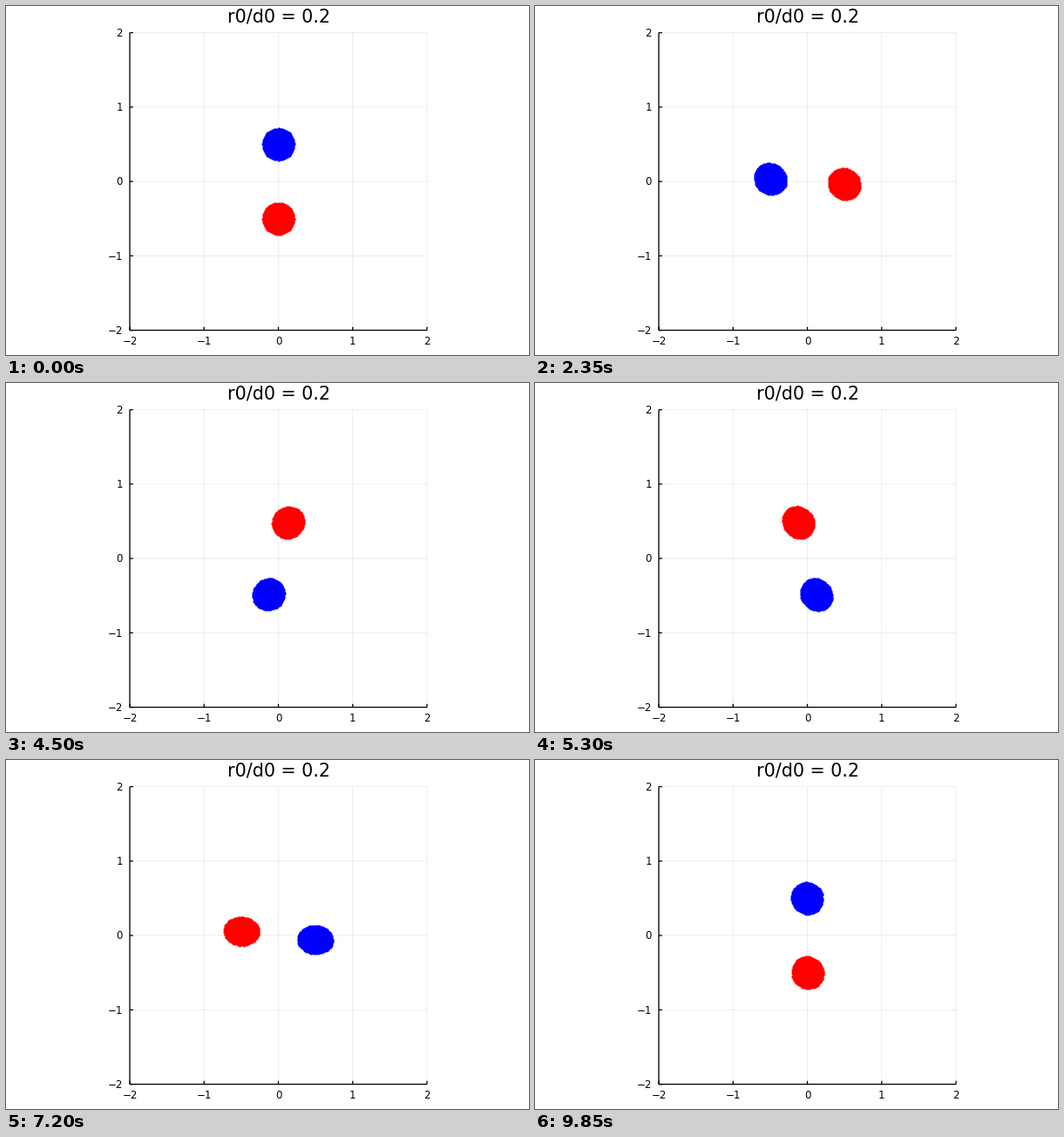
Write a matplotlib script that moves like this. It is 600 px wide and 400 px high and loops after 9900 ms.

```python
import numpy as np
import matplotlib.pyplot as plt
from matplotlib.animation import FuncAnimation

W, H, DPI = 600, 400, 100
FRAMES, INTERVAL = 198, 50
PX = 72 / DPI                       # points per pixel
CX, CY, UNIT = 312.5, 201.1, 85.25  # plot centre and pixels per data unit

RADIUS, RINGS = 0.2, 8              # vortex patch of concentric rings
TURN = np.radians(1.83)             # orbit angle per frame
SUBSTEPS = 2


def to_x(x):
    return CX + UNIT * x


def to_y(y):
    return CY - UNIT * y


def patch():
    """Points filling a disc evenly, centred at 0.5i."""
    points = [0j]
    for k in range(1, RINGS + 1):
        angles = 2 * np.pi * np.arange(6 * k) / (6 * k)
        points.extend(RADIUS * k / RINGS * np.exp(1j * angles))
    return np.array(points) + 0.5j


def velocity(z, eye):
    """Point vortices of one patch, moved by each other and the mirrored patch."""
    own = (1 / (z[:, None] - z + eye)).sum(axis=1) - 1
    other = (1 / (z[:, None] + z)).sum(axis=1)
    return np.conj(TURN / (2j * len(z)) * (own + other))


def simulate():
    z = patch()
    eye = np.eye(len(z))
    h = 1 / SUBSTEPS
    path = [z]
    for n in range(1, FRAMES):
        for _ in range(SUBSTEPS):
            a = velocity(z, eye)
            b = velocity(z + h / 2 * a, eye)
            c = velocity(z + h / 2 * b, eye)
            d = velocity(z + h * c, eye)
            z = z + h / 6 * (a + 2 * b + 2 * c + d)
        # keep the orbit at its nominal rate
        centre = z.mean()
        z = z * np.exp(1j * (np.pi / 2 + n * TURN)) * abs(centre) / centre
        path.append(z)
    return path


fig = plt.figure(figsize=(W / DPI, H / DPI), dpi=DPI, facecolor="white")
ax = fig.add_axes([0, 0, 1, 1])
ax.set_xlim(0, W)
ax.set_ylim(H, 0)
ax.axis("off")


def line(x, y, width, alpha=1.0, z=1):
    ax.plot(x, y, color="black", lw=width * PX, alpha=alpha, zorder=z,
            snap=False, solid_capstyle="butt")


def label(x, y, text, size, ha="center"):
    ax.text(x, y, text, fontsize=size * PX, family="DejaVu Sans",
            color="black", ha=ha, va="baseline")


LEFT, RIGHT = to_x(-2), to_x(2)
TOP, BOTTOM = to_y(2), to_y(-2)

for v in range(-2, 3):
    x, y = to_x(v), to_y(v)
    line([x, x], [TOP, BOTTOM], 0.7, 0.1)
    line([LEFT, RIGHT], [y, y], 0.7, 0.1)
    line([x, x], [BOTTOM, BOTTOM - 3.8], 1.3, z=2)
    line([LEFT, LEFT + 3.8], [y, y], 1.3, z=2)
    text = str(v).replace("-", "\u2212")
    label(x, 387.6, text, 11.8)
    label(133.8, y + 4.3, text, 11.8, "right")

line([LEFT, LEFT], [TOP, BOTTOM], 1.3, z=2)
line([LEFT, RIGHT], [BOTTOM, BOTTOM], 1.3, z=2)
label(CX, 18.5, "r0/d0 = 0.2", 20.7)

path = simulate()


def dots(color):
    return ax.scatter([], [], s=(4.2 * PX) ** 2, color=color, linewidths=0, zorder=3)


blue, red = dots("#0000ff"), dots("#ff0000")


def update(n):
    z = path[n]
    blue.set_offsets(np.column_stack([to_x(z.real), to_y(z.imag)]))
    red.set_offsets(np.column_stack([to_x(-z.real), to_y(-z.imag)]))
    return blue, red


anim = FuncAnimation(fig, update, frames=FRAMES, interval=INTERVAL,
                     init_func=lambda: update(0), repeat=True)
plt.show()
```
